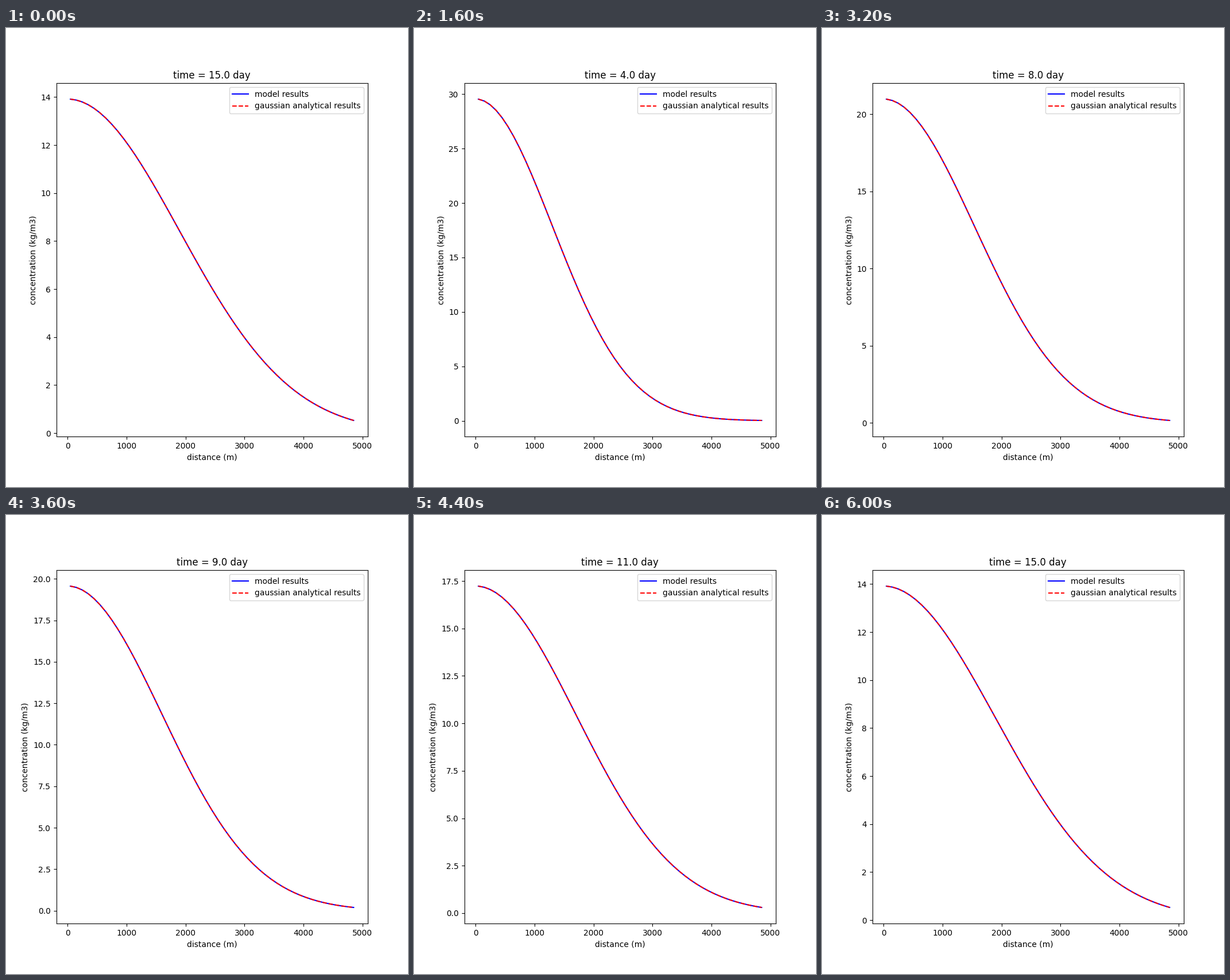
A matplotlib script that plays this animation: 700x800 px, repeating every 6400 ms.

```python
import numpy as np
import matplotlib.pyplot as plt
from matplotlib.animation import FuncAnimation

DAYS = 15
DAY_SECONDS = 86400
DIFFUSIVITY = 1.0    # m2/s
SIGMA = 1000.0       # initial spread, m
PEAK = 50.0          # initial concentration, kg/m3

x = np.arange(50, 4851, 100)


def concentration(day):
    """Gaussian patch spreading in two dimensions, cut through its centre."""
    variance = SIGMA**2 + 2 * DIFFUSIVITY * day * DAY_SECONDS
    return PEAK * SIGMA**2 / variance * np.exp(-x**2 / (2 * variance))


fig, ax = plt.subplots(figsize=(7, 8), dpi=100)
model, = ax.plot(x, concentration(DAYS), "b-", label="model results")
exact, = ax.plot(x, concentration(DAYS), "r--",
                 label="gaussian analytical results")
ax.set_xlabel("distance (m)")
ax.set_ylabel("concentration (kg/m3)")
ax.legend(loc="upper right")


def update(step):
    # The loop opens on the last day, then runs from day 1.
    day = (step - 1) % DAYS + 1
    values = concentration(day)
    model.set_ydata(values)
    exact.set_ydata(values)
    ax.relim()
    ax.autoscale_view()
    ax.set_title(f"time = {day:.1f} day")
    return model, exact


anim = FuncAnimation(fig, update, frames=DAYS + 1, interval=400,
                     init_func=lambda: update(0), repeat=True,
                     repeat_delay=0, blit=False)

plt.show()
```
